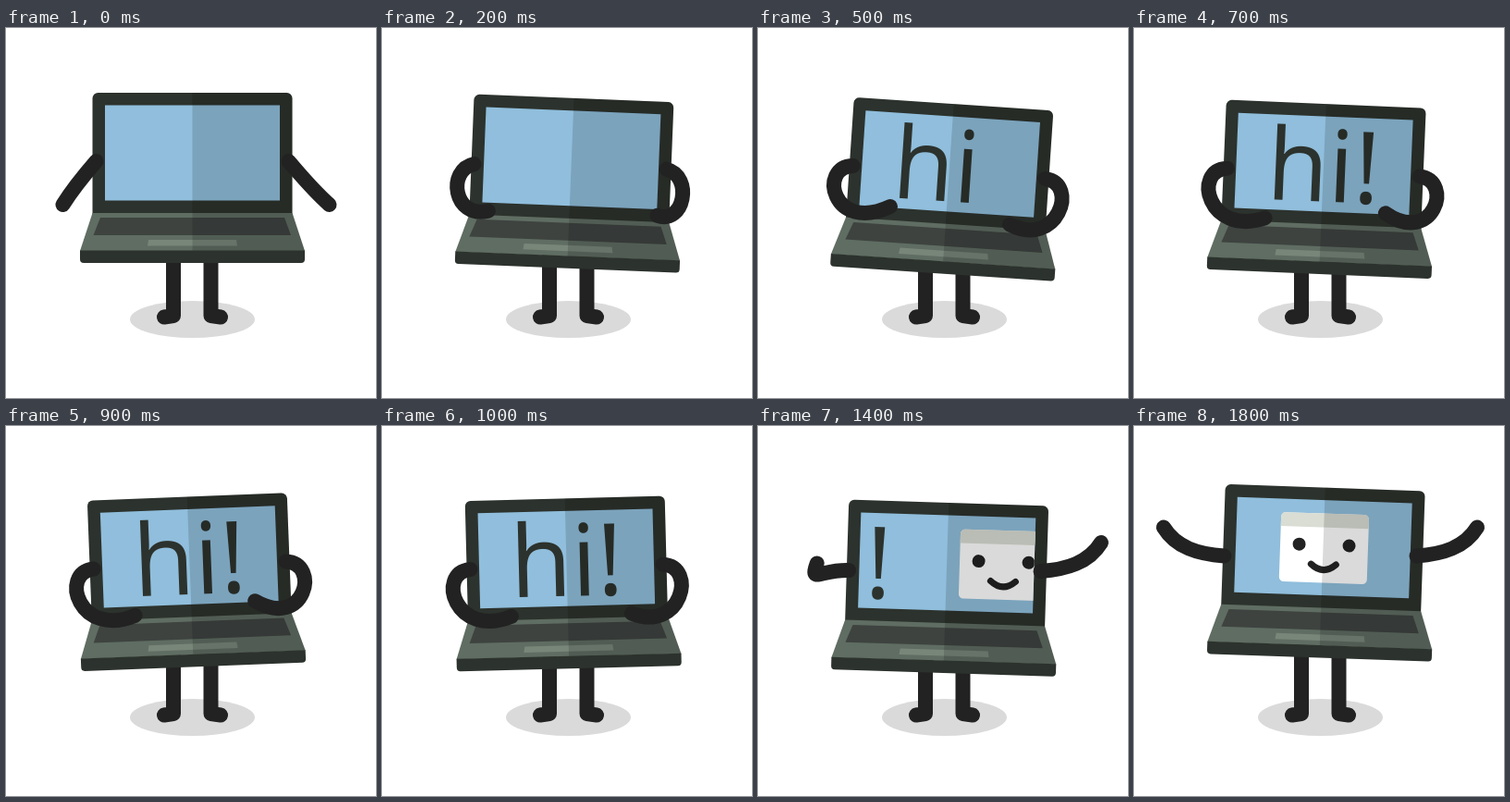
Write an HTML page with a canvas that moves like this. It is 400 px wide and 400 px high and loops after 2.2 s.

```html
<!DOCTYPE html>
<html lang="en">
<head>
<meta charset="utf-8">
<title>Hello laptop</title>
<style>
  html, body { margin: 0; width: 100%; height: 100%; overflow: hidden; background: #fff; }
  canvas { display: block; width: 400px; height: 400px; }
</style>
</head>
<body>
<canvas id="stage" width="400" height="400"></canvas>
<script>
const ctx = document.getElementById('stage').getContext('2d');
const LOOP = 2200, STEP = 100, LAST_MOVE = 1800;
const PIVOT = { x: 201.5, y: 220 };
const LIMB = '#222', CASE = '#2c322d', SHADE = 'rgba(0,0,0,.145)';

const mix = (a, b, u) => a + (b - a) * u;
const mixAll = (a, b, u) => a.map((v, i) => mix(v, b[i], u));
const ramp = (t, from, to) => Math.min(1, Math.max(0, (t - from) / (to - from)));

// Body sway: time, tilt in degrees, drop
const sway = [
  [0, 0, 0], [400, 4.6, 11.6], [700, 2.4, 12], [900, -2.2, 6.4],
  [1200, 0, 12], [1400, 1.8, 13], [1800, 2, -3.5]
];

// Right arm around the pivot: two bend points and the hand; the left arm mirrors it
const REST = [117, -61, 130, -45, 144, -29];
const TYPE = [142, -73, 122, -1, 65, -24];
const WAVE = [132, -78, 156, -85, 169.5, -107];

function swayAt(t) {
  const i = Math.max(1, sway.findIndex(([time]) => time >= t));
  const [a, b] = [sway[i - 1], sway[i]];
  return mixAll(a, b, ramp(t, a[0], b[0])).slice(1);
}

function shape(color, ...points) {
  ctx.fillStyle = color;
  ctx.beginPath();
  points.forEach(([x, y]) => ctx.lineTo(x, y));
  ctx.fill();
}

function box(color, x, y, w, h, r = 0) {
  ctx.fillStyle = color;
  ctx.beginPath();
  ctx.roundRect(x, y, w, h, r);
  ctx.fill();
}

function oval(color, x, y, rx, ry = rx) {
  ctx.fillStyle = color;
  ctx.beginPath();
  ctx.ellipse(x, y, rx, ry, 0, 0, 7);
  ctx.fill();
}

function line(path, width) {
  ctx.strokeStyle = LIMB;
  ctx.lineWidth = width;
  ctx.lineCap = ctx.lineJoin = 'round';
  ctx.stroke(new Path2D(path));
}

function drawFace() {
  box('#fff', 155, 98, 95, 75, 5);
  box('#d9ddd3', 155, 98, 95, 15, [5, 5, 0, 0]);
  for (const side of [-1, 1]) oval(LIMB, 202.5 + side * 27, 132, 7);
  line('M189 153Q202.5 165 216 153', 7);
}

function drawScreen(t) {
  const typed = [300, 500, 600].filter(at => t >= at).length;
  const width = 181, slide = width * ramp(t, 1200, 1500);
  box('#90bedc', 107, 83.5, 189, 103);
  ctx.save();
  ctx.beginPath();
  ctx.rect(107, 83.5, 189, 103);
  ctx.clip();
  ctx.translate(-slide, 0);
  ctx.fillStyle = CASE;
  ctx.font = '108px "Open Sans", sans-serif';
  ctx.fillText('hi!'.slice(0, typed), 140.5, 175.5);
  ctx.translate(width, 0);
  if (slide) drawFace();
  ctx.restore();
}

function drawLaptop(t) {
  box(CASE, 93.5, 70, 216, 132, [6, 6, 0, 0]);
  drawScreen(t);
  shape('#5f6d62', [93.5, 200], [309.5, 200], [323, 241], [80, 241]);
  shape('#3e4340', [102, 205], [301, 205], [308, 224], [94.5, 224]);
  shape('#78867a', [154, 229], [249, 229], [250, 235.5], [153, 235.5]);
  box(SHADE, 201.5, 70, 108, 130, [0, 6, 0, 0]);
  shape(SHADE, [201.5, 200], [309.5, 200], [323, 241], [201.5, 241]);
  box(CASE, 80, 240.5, 243, 13.5, [0, 0, 4, 4]);
}

// The arms follow the body's tilt while typing, with the hands tapping in turn.
function drawArm(side, t, tilt) {
  const delay = side < 0 ? 100 : 0;
  const wave = ramp(t, 1100 + delay, 1380 + delay);
  const typing = ramp(t, 0, 300) * (1 - wave);
  const pose = mixAll(mixAll(REST, TYPE, ramp(t, 0, 300)), WAVE, wave);
  const lift = Math.max(0, -side * Math.cos((t - 400) / 400 * Math.PI));
  pose[4] += side * 4 * (1 - wave);
  pose[5] -= 15 * lift * typing;

  ctx.save();
  ctx.rotate(tilt * typing);
  ctx.scale(side, 1);
  line(`M104 -76C${pose.join(' ')}`, 16);
  ctx.restore();
}

function draw(t) {
  const [degrees, drop] = swayAt(t);
  const tilt = degrees * Math.PI / 180;

  box('#fff', 0, 0, 400, 400);
  oval('#dadada', PIVOT.x, 315, 67.5, 20);
  line('M181 240V311L171 312.5', 16);
  line('M221.5 240V311L232 312.5', 16);

  ctx.save();
  ctx.translate(PIVOT.x, PIVOT.y + drop);
  ctx.save();
  ctx.rotate(tilt);
  ctx.translate(-PIVOT.x, -PIVOT.y);
  drawLaptop(t);
  ctx.restore();
  for (const side of [-1, 1]) drawArm(side, t, tilt);
  ctx.restore();
}

const start = performance.now();

// The motion advances in steps of a tenth of a second and rests on the last pose.
function tick() {
  const t = (performance.now() - start) % LOOP;
  draw(Math.min(LAST_MOVE, Math.floor(t / STEP) * STEP));
  requestAnimationFrame(tick);
}
tick();
</script>
</body>
</html>
```
